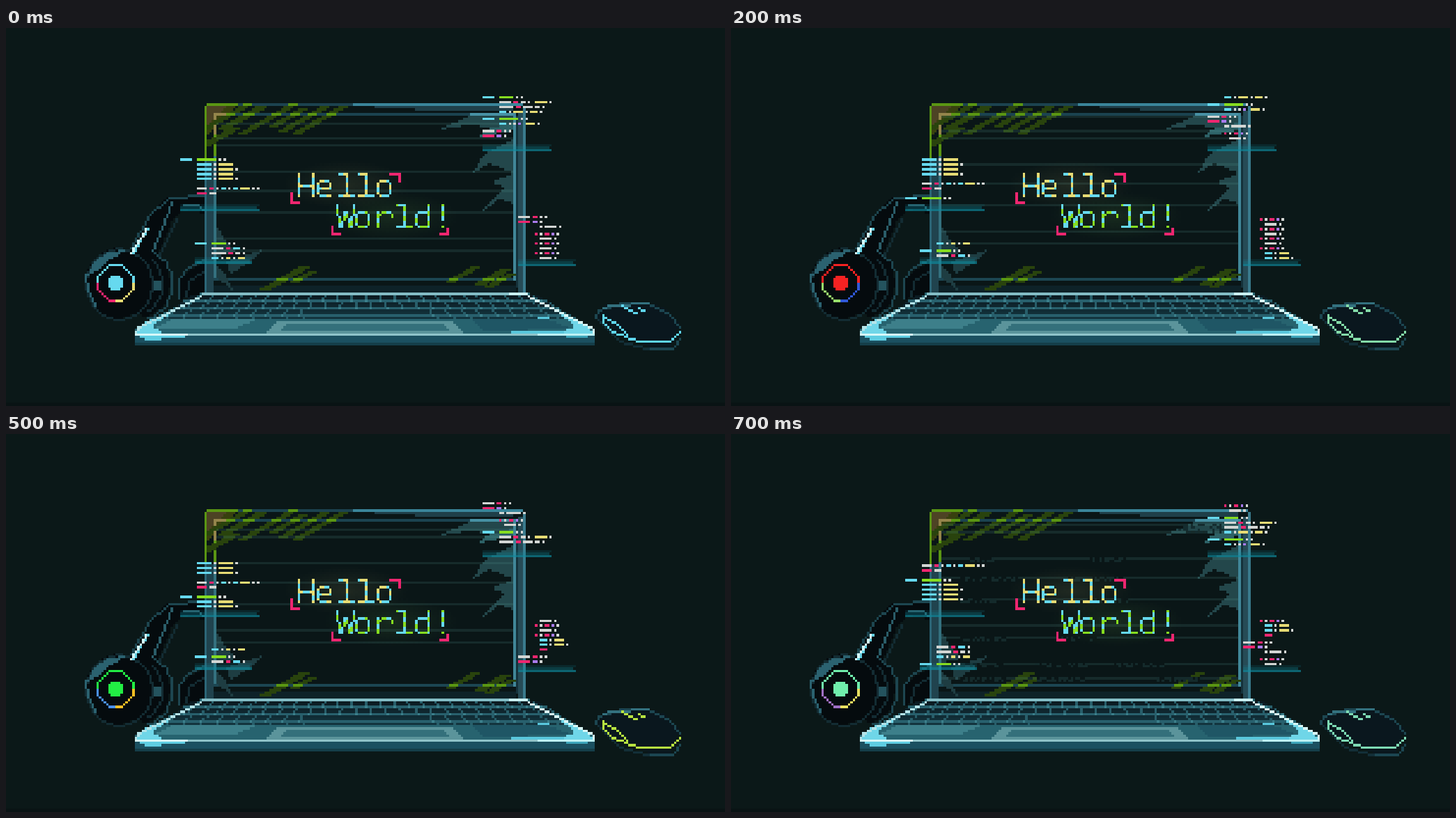
Recreate the animation shown at these times as an HTML page with a canvas. Size 1032 by 543 pixels, loop 800 ms.

```html
<!DOCTYPE html>
<html lang="en">
<head>
<meta charset="utf-8">
<title>Hello World!</title>
<style>
html, body { margin: 0; width: 100%; height: 100%; overflow: hidden; background: #0b1818; }
canvas { display: block; }
</style>
</head>
<body>
<canvas id="stage" width="1032" height="543" role="img" aria-label="Hello World!"></canvas>
<script>
const stage = document.getElementById('stage').getContext('2d');
const art = document.createElement('canvas');
art.width = 301;
art.height = 158;
const g = art.getContext('2d');
const CELL = 3.44, STEP = 100, STEPS = 8;
const BG = '#0b1818', GLASS = '#0a1617';
const INK = { b: '#66d9ef', g: '#86dd20', p: '#ee2670', y: '#e6db74', w: '#d3d6d4', v: '#a97bf0' };

// ---- pixel helpers, all in art cells ----
function px(c, x, y, w = 1, h = 1) {
  g.fillStyle = c.call ? c(x, y) : c;
  g.fillRect(x, y, w, h);
}
function line(c, ...p) {
  for (let i = 0; i + 3 < p.length; i += 2) {
    const dx = p[i + 2] - p[i], dy = p[i + 3] - p[i + 1];
    const n = Math.max(Math.abs(dx), Math.abs(dy)) || 1;
    for (let k = 0; k <= n; k++) px(c, Math.round(p[i] + dx * k / n), Math.round(p[i + 1] + dy * k / n));
  }
}
function poly(c, ...p) {
  const ys = p.filter((_, i) => i % 2);
  for (let y = Math.floor(Math.min(...ys)); y < Math.max(...ys); y++) {
    const hits = [], m = y + 0.5;
    for (let i = 0; i < p.length; i += 2) {
      const j = (i + 2) % p.length;
      if ((p[i + 1] <= m) !== (p[j + 1] <= m))
        hits.push(p[i] + (m - p[i + 1]) / (p[j + 1] - p[i + 1]) * (p[j] - p[i]));
    }
    hits.sort((a, b) => a - b);
    for (let i = 0; i + 1 < hits.length; i += 2) {
      const a = Math.round(hits[i]);
      px(c, a, y, Math.round(hits[i + 1]) - a);
    }
  }
}
function arc(cx, cy, rx, ry, from = 0, to = 360) {
  const p = [];
  for (let i = 0; i <= 20; i++) {
    const a = (from + (to - from) * i / 20) * Math.PI / 180;
    p.push(Math.round(cx + rx * Math.cos(a)), Math.round(cy + ry * Math.sin(a)));
  }
  return p;
}
function seeded(s) {
  return () => (s = (s * 16807) % 2147483647) / 2147483647;
}
function mix(a, b, t) {
  const at = i => Math.round(a[i] + (b[i] - a[i]) * t);
  return `rgb(${at(0)},${at(1)},${at(2)})`;
}

// ---- laptop ----
const isFrame = y => y === 31 || y === 35 || y === 104;

// parallel slanted strokes, lit where they cross the frame
function hatch(x, y, count, gap, rows, seed) {
  const rnd = seeded(seed);
  for (let k = 0; k < count; k++) {
    const skip = Math.floor(rnd() * 3), w = 4 + Math.floor(rnd() * 2);
    const n = rows - Math.floor(rnd() * 4);
    for (let i = skip; i < n; i++) {
      const a = Math.round(x + k * gap - 1.75 * i);
      const from = Math.max(84, a), to = Math.min(216, a + w);
      if (to > from) px(isFrame(y + i) ? '#5a9613' : '#29430d', from, y + i, to - from);
    }
  }
}
function drawLid() {
  px(GLASS, 84, 32, 133, 78);
  // bezel
  px('#20434e', 84, 54, 3, 56);
  px('#2c6677', 83, 32, 1, 78);
  px('#34717f', 87, 35, 1, 70);
  px('#1c4350', 84, 31, 61, 1);
  px('#3a859a', 145, 31, 71, 1);
  poly('#1f3f49', 145, 32, 212, 32, 212, 34, 180, 34);
  px('#1b4350', 88, 35, 106, 1);
  px('#15323b', 213, 36, 1, 72);
  px('#264b56', 214, 34, 2, 76);
  px('#3a7b8d', 216, 32, 1, 78);
  px('#1c4652', 87, 104, 126, 1);
  px('#0e2228', 87, 107, 126, 3);
  // light on the right of the glass
  const pale = '#23474b';
  poly(pale, 194, 36, 212, 36, 212, 42, 193, 40, 181, 42);
  poly('#2d6166', 200, 42, 212, 39, 212, 42, 197, 45);
  poly(pale, 212, 46, 212, 60, 202, 56, 195, 60, 200, 52);
  poly(pale, 212, 60, 212, 73, 206, 71, 199, 76, 208, 66, 203, 64);
  px('#4791a4', 194, 35, 18);
  px('#418799', 212, 35, 1, 70);
  // light at the lower left
  poly('#1e3d42', 88, 82, 93, 90, 97, 93, 88, 95);
  poly('#1e3d42', 92, 97, 107, 92, 101, 98, 94, 102);
  poly('#1e3d42', 88, 99, 92, 103, 95, 109, 88, 104);
  // green reflections
  poly('#38400f', 84, 32, 97, 32, 84, 44);
  poly('#4d4324', 84, 32, 92, 32, 84, 41);
  px('#5a9613', 84, 31, 13);
  px('#5a9613', 83, 32, 1, 22);
  px('#94854b', 87, 35, 8);
  line('#94854b', 87, 35, 87, 43);
  line('#5a9613', 87, 44, 87, 52);
  hatch(93, 41, 1, 0, 11, 5);
  hatch(99, 31, 2, 7, 13, 3);
  hatch(118, 31, 4, 7.5, 13, 8);
  hatch(122, 99, 2, 7, 10, 4);
  hatch(194, 99, 1, 0, 10, 9);
  hatch(206, 100, 2, 6, 9, 6);
}
function drawKeys() {
  const inset = y => 73 + (y - 111) * 1.3;
  for (let y = 111; y < 121; y++) {
    const half = Math.round(inset(y)), isGap = y % 3 === 2 && y > 111;
    px(isGap ? '#28606d' : mix([11, 27, 34], [20, 55, 65], (y - 111) / 10), 150 - half, y, half * 2);
    for (let k = -12; k <= 12; k++) {
      const x = Math.round(150 + k * (5.8 + (y - 111) * 0.14) + Math.floor((y - 111) / 3) % 2 * 2);
      if (y < 117 || Math.abs(k) > 3) px(isGap ? '#3b7f8b' : '#285e6a', x, y);
    }
  }
}
function drawDeck() {
  poly('#27636f', 82, 110, 218, 110, 246, 125, 246, 128, 54, 128, 54, 125);
  drawKeys();
  poly('#3d7f8a', 70, 121, 105, 121, 96, 125, 62, 125);
  poly('#1f5665', 194, 121, 226, 121, 236, 125, 200, 126);
  poly('#5b949b', 113, 122, 187, 122, 191, 127, 108, 127);
  poly('#34707b', 117, 123, 182, 123, 185, 126, 114, 126);
  // bright corners
  poly('#6fd6e8', 54, 126, 58, 122, 70, 118, 61, 124, 66, 127, 54, 128);
  poly('#6fd6e8', 246, 128, 242, 123, 230, 118, 238, 124, 230, 127);
  px('#59c7dc', 211, 126, 22);
  px('#59c7dc', 222, 120, 5);
  line('#b4e4e9', 81, 111, 55, 124, 54, 126);
  line('#d8f7f6', 218, 111, 244, 124, 245, 126);
  px('#83bcc5', 82, 110, 136);
  px('#c9eff1', 210, 110, 8);
  // front edge
  px('#8fc3c9', 54, 127, 192);
  px('#d6f8f9', 54, 127, 22);
  px('#bdf2f5', 222, 127, 24);
  px('#1b5060', 54, 128, 192, 3);
  px('#153e49', 54, 131, 192);
  px('#5ecde2', 56, 128, 19);
  px('#5ecde2', 58, 129, 7);
  px('#3ea6bb', 234, 128, 9);
}

// ---- headphones and mouse ----
function drawHeadphones() {
  const edge = '#1d4650', dim = '#132c33', dark = '#050b0e';
  // far cup
  poly(dark, 72, 113, 73, 103, 83, 97, 83, 110);
  line(edge, 72, 112, 72, 104, 75, 100, 82, 96);
  line(dim, 75, 111, 76, 105, 82, 101);
  // band
  poly(dark, 50, 95, 61, 76, 68, 70, 83, 70, 83, 77, 74, 75, 70, 79, 62, 98);
  line(edge, 52, 91, 60, 77, 68, 70, 83, 69);
  line('#2a5d69', 69, 72, 66, 80, 60, 95);
  line('#2a5d69', 74, 73, 80, 73, 82, 75);
  line(dim, 71, 79, 68, 86, 63, 95);
  // near cup
  poly(dark, ...arc(58, 106, 11, 14));
  line(edge, ...arc(58, 106, 11, 14, -70, 85));
  line(dim, ...arc(56, 106, 9, 12, -60, 70));
  px('#24535e', 57, 105, 8, 4);
  px(dim, 60, 103, 2, 7);
  poly(dark, ...arc(47, 106, 14, 15));
  line(dim, ...arc(47, 106, 14, 15));
  poly('#2b6270', 34, 103, 37, 97, 43, 93, 51, 92, 44, 96, 38, 101);
  line('#2b6270', 33, 102, 34, 109, 37, 115);
  // shine on the arm
  line('#63cfe2', 59, 83, 57, 86, 53, 93);
  line('#d5fafa', 58, 83, 56, 87, 52, 93);
}
function drawRing(step) {
  const [top, left, right] = RING[step].split(' ').map(c => '#' + c);
  const tint = (x, y) => y < 106 ? top : x < 46 ? left : right;
  line(tint, ...arc(45.5, 105.5, 8, 8, 22.5, 382.5).filter((_, i) => i < 0));
  line(tint, 43, 98, 48, 98, 53, 103, 53, 108, 48, 113, 43, 113, 38, 108, 38, 103, 43, 98);
  px(top, 44, 103, 4, 6);
  px(top, 43, 104, 6, 4);
}
function drawMouse(step) {
  const t = step < 5 ? step / 5 : (STEPS - step) / 3;
  const glow = mix([95, 214, 238], [184, 227, 64], t);
  const edge = '#1c4651';
  poly('#0a171e', 246, 119, 250, 115, 267, 114, 276, 117, 281, 123, 278, 133, 269, 133, 249, 124);
  line(edge, 246, 120, 247, 117, 257, 114, 267, 114, 276, 118, 281, 124);
  line('#33717f', 249, 116, 252, 115, 268, 114);
  line(edge, 281, 129, 278, 133, 269, 133);
  line('#132f38', 247, 121, 256, 130, 268, 133);
  line(glow, 249, 119, 249, 122, 253, 126, 264, 130, 277, 130, 281, 126);
  line(glow, 250, 120, 254, 122, 259, 127);
  line(glow, 257, 115, 260, 117, 263, 118);
  line(glow, 264, 116, 266, 117);
}

// ---- lettering: h and v draw bars, d a diagonal, inside a letter ----
const bowl = ({ h, v }) => { h(1, 4, 3); h(1, 4, 9); v(0, 4, 8); };
const LETTERS = {
  H: ({ h, v }) => { v(0, 0, 9); v(6, 0, 9); h(0, 6, 5); },
  e: p => { bowl(p); p.v(5, 4, 6); p.h(0, 5, 6); p.h(5, 5, 9); },
  l: ({ h, v }) => { v(3, 0, 9); h(0, 3, 0); h(0, 6, 9); },
  o: p => { bowl(p); p.v(5, 4, 8); },
  W: ({ d }) => { d(0, 0, 1, 9); d(2, 9, 3, 3); d(4, 3, 5, 9); d(6, 9, 7, 0); },
  r: ({ h, v, d }) => { v(0, 3, 9); d(0, 5, 2, 3); h(2, 5, 3); v(6, 4, 5); },
  d: p => { bowl(p); p.v(5, 0, 9); },
  '!': ({ v }) => { v(2, 0, 6); v(2, 9, 9); }
};
function write(text, x, y, accent) {
  const tint = (a, b) => (a * 2 + b * 3) % 13 < 7 ? INK.b : accent;
  [...text].forEach((ch, i) => {
    const left = Math.round(x + i * 8.3);
    const d = (x1, y1, x2, y2) => line(tint, left + x1, y + y1, left + x2, y + y2);
    LETTERS[ch]({ d, h: (a, b, r) => d(a, r, b, r), v: (c, a, b) => d(c, a, c, b) });
  });
}
function corner(x, y, dx, dy, w, h) {
  line(INK.p, x + dx * w, y, x, y, x, y + dy * h);
}
function halo(x, y, rx, color) {
  g.save();
  g.translate(x, y);
  g.scale(rx, 10);
  const grad = g.createRadialGradient(0, 0, 0, 0, 0, 1);
  grad.addColorStop(0, `rgba(${color},.12)`);
  grad.addColorStop(1, `rgba(${color},0)`);
  g.fillStyle = grad;
  g.fillRect(-1, -1, 2, 2);
  g.restore();
}
function drawText() {
  halo(142, 65, 26, '190,180,110');
  halo(161, 78, 28, '120,190,80');
  write('Hello', 122, 60, INK.y);
  write('World!', 138, 73, INK.g);
  corner(164, 60, -1, 1, 4, 3);
  corner(119, 72, 1, -1, 3, 4);
  corner(136, 85, 1, -1, 3, 3);
  corner(184, 85, -1, -1, 3, 2);
}

// ---- scrolling code ----
// One text line per code line, a blank line is one empty row.
// b5 = five blue cells, > = indent, - = one more empty cell; tokens stand one cell apart.
const byLines = s => 2 * Math.floor(1.5 * s);
const COLUMNS = [
  { x: 199, row: 28, top: 27, end: 45, scroll: byLines, code: `b5 - g6 w w
> w5 p2 w2 w - y5 w
> w6 p2 w4 w2 w
> b3 w y4 w y3 w

b5 - g8 w w
> b3 w w v - y4 w

w5 p2 w w
p5 v2 w
> w2 w6 w

> p w p2 v w
> - - w5 w
` },
  { x: 73, row: 54, top: 53, end: 71, scroll: s => Math.max(s, 6 * s - 30), code: `b5 - g8 w w
> b6 w y6
> b6 w y6 w
> b6 w y6
> b6 w y6 w


> w4 p2 w b2 w b2 y4 w w
> p4 w3

` },
  { x: 79, row: 89, top: 88, end: 95, scroll: s => s % 3 * 3, code: `b5 - g6 w w
> w5 p2 b3 w
> w6 p2 w2 w
> b3 w y2 w y3
` },
  { x: 214, row: 78, top: 77, end: 95, scroll: byLines, code: `w5 p2 w w
p5 v2 w
> - - w w5 w

> p w p2 v w
> - - w5 w
> p w p2 v w
> - - w5 w
> p w p2 v w
> - - w5 w
> p w p2 v w
> - - b3 w y4
> - - b3 w y4 w
> - - p3
` }
];
function parse(col) {
  let y = col.row;
  col.lines = [];
  for (const text of col.code.split('\n')) {
    if (text) col.lines.push({ y, tokens: text.split(' ') });
    y += text ? 2 : 1;
  }
  col.cycle = y - col.row;
}
COLUMNS.forEach(parse);

function drawCode(col, step) {
  for (const { y: row, tokens } of col.lines) {
    for (const lap of [0, col.cycle]) {
      const y = row + lap - col.scroll(step);
      if (y < col.top || y > col.end) continue;
      let x = col.x;
      for (const t of tokens) {
        const n = +t.slice(1) || 1;
        if (t === '>') x += 7;
        else if (t === '-') x += 1;
        else {
          px(INK[t[0]], x, y, n);
          x += n + 1;
        }
      }
    }
  }
}
function bar(x, y, w) {
  [.14, .32, .66].forEach((a, i) => px(`rgba(14,140,160,${a})`, x, y - 2 + i, w - i % 2));
}

// ---- faint lines on the glass ----
const SCAN = [39, 45, 48, 59, 67, 76, 87, 92];
const SCAN_INK = 'rgba(90,170,165,.14)';
function drawScan(step) {
  for (const r of SCAN) {
    const y = r - step - (step > 1);
    if (y > 35) px(SCAN_INK, 88, y, 124);
  }
  if (step === STEPS - 1) drawStatic();
}
function drawStatic() {
  const rnd = seeded(77);
  px(SCAN_INK, 88, 95, 124);
  px(SCAN_INK, 88, 101, 124);
  for (const y of [51, 59, 68, 84, 95, 101]) {
    for (let x = 96; x < 185; x += 30 + Math.floor(rnd() * 25)) {
      const w = 14 + Math.floor(rnd() * 14);
      px(GLASS, x, y, w);
      for (let i = 0; i < w * 2; i++) if (rnd() < .5) px('#142a2b', x + i % w, y + (i < w ? 0 : 1));
    }
  }
  for (let i = 0; i < 40; i++) px('#142c2f', 186 + Math.floor(rnd() * 20), 37 + Math.floor(rnd() * 4));
}

// ring colours per step: top, lower left, lower right
const RING = [
  '66d9ef f02670 e6db74', 'dc8587 f3924c a5cdc6', 'f52222 98de6c 3058d8', 'c4d030 30b0d0 d040c0',
  '22dd70 8a34e0 f08e22', '22ee44 4a90f0 f3be24', '40f080 7080e0 f0d040', '70eeac a070c4 e8e060'
];

function draw(step) {
  px(BG, 0, 0, 301, 158);
  px('#091314', 0, 156, 301, 2);
  drawHeadphones();
  drawRing(step);
  drawLid();
  drawScan(step);
  drawDeck();
  drawMouse(step);
  drawText();
  bar(199, 50, 29);
  bar(73, 75, 33);
  bar(79, 97, 24);
  bar(214, 98, 24);
  COLUMNS.forEach(c => drawCode(c, step));
  stage.fillStyle = BG;
  stage.fillRect(0, 0, 1032, 543);
  stage.imageSmoothingEnabled = false;
  stage.drawImage(art, -0.9, 1.7, art.width * CELL, art.height * CELL);
}

const start = performance.now();
let shown = -1;
function tick() {
  const step = Math.floor((performance.now() - start) / STEP) % STEPS;
  if (step !== shown) draw(shown = step);
  requestAnimationFrame(tick);
}
tick();
</script>
</body>
</html>
```
